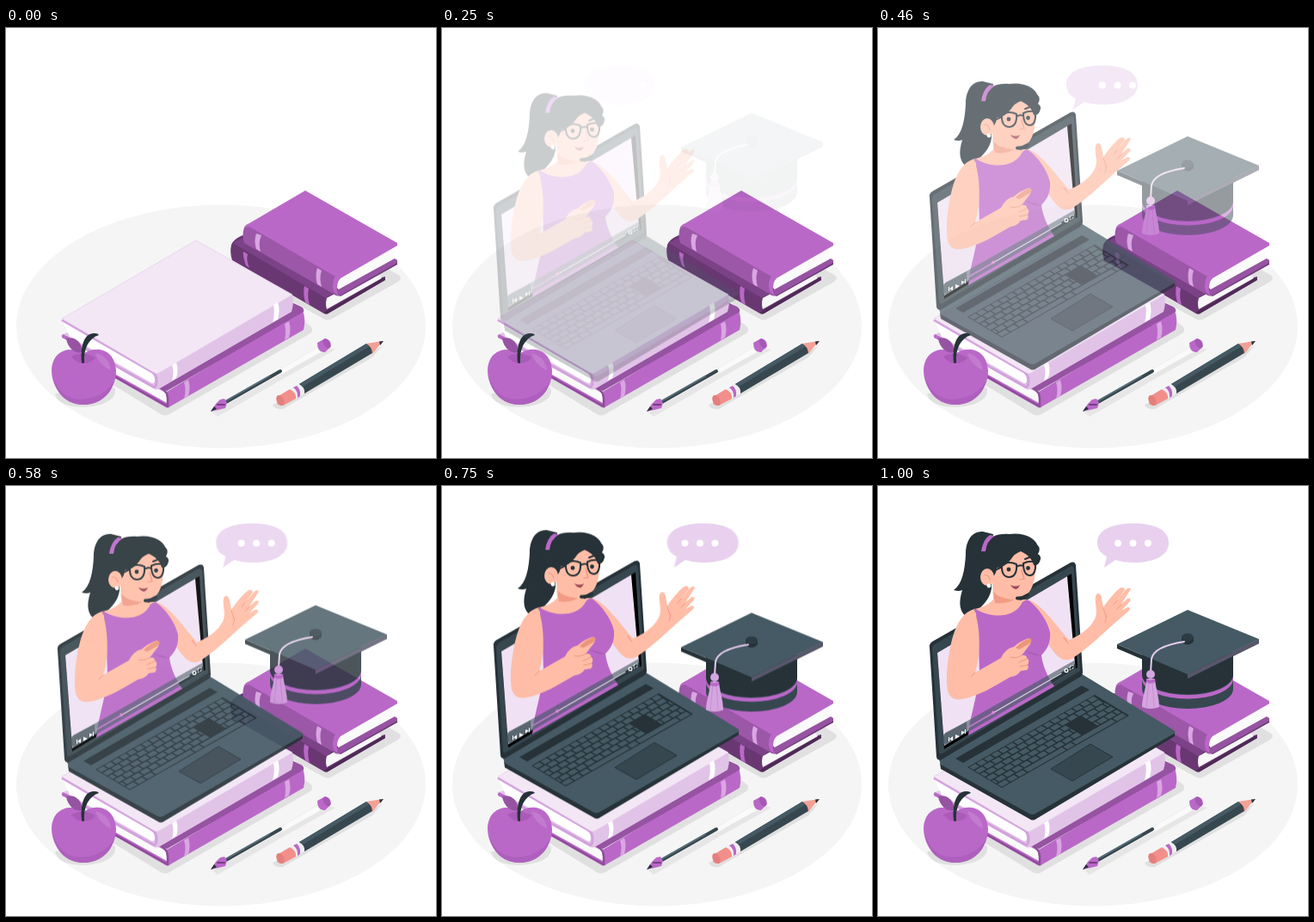
Animation, 500 px wide and 500 px high, one loop 1.04 s. Source, as an HTML page without scripts:

```html
<!DOCTYPE html>
<html lang="en">
<head>
<meta charset="utf-8">
<title>Online lesson</title>
<style>
  html, body { margin: 0; width: 100%; height: 100%; overflow: hidden; background: #fff; }
  svg { display: block; width: 100%; height: 100%; }
  .slide { animation: slide 1040ms cubic-bezier(.36, -.01, .5, 1.38) infinite; }
  .up { --x: 0px; --y: 30px; }
  .down { --x: 0px; --y: -30px; }
  .left { --x: -60px; --y: 0px; }
  @keyframes slide {
    0% { opacity: 0; transform: translate(var(--x), var(--y)); }
    93%, 100% { opacity: 1; transform: translate(0px, 0px); }
  }
  .violet { fill: #ba68c8; }
  .plum { fill: #9653a2; }
  .lilac { fill: #e1c3e8; }
  .dark { fill: #263238; }
  .slate { fill: #37474f; }
  .steel { fill: #455a64; }
  .skin { fill: #ffbda7; }
  .white { fill: #fff; }
  .shade { fill: #e0e0e0; }
  .line { fill: none; stroke-linecap: round; stroke-linejoin: round; }
</style>
</head>
<body>
<svg viewBox="0 0 500 500">
  <ellipse cx="250" cy="347" rx="238" ry="141.5" fill="#f5f5f5"/>

  <g class="shade">
    <path d="M100 400L180 449Q185 452 190 449L354 355Q359 350 352 345L330 330Z"/>
    <path d="M300 300L369 338Q374 341 379 338L456 295Q462 290 456 287L440 278Z"/>
    <path d="M57 425C60 440 82 442 100 440C120 437 130 428 126 418Z"/>
    <path d="M240 447L320 402L376 372L383 374L322 408L246 452Z" opacity=".7"/>
    <path d="M310 438L338 424L420 380L438 369L426 383L346 429L322 443Q312 444 310 438Z"/>
  </g>

  <!-- right-hand books -->
  <g>
    <path d="M262 252Q264 246 275 241L386 303L441 289V293L376 331Q372 334 368 331L263 270Q260 261 262 252Z" fill="#693872"/>
    <path d="M264 250L277 243L384 306L372 314Z" fill="#7c4287"/>
    <path d="M373 314L430 283L437 291L373 327Q371 320 373 314Z" fill="#f7f7f7"/>
    <path d="M372 329L439 290L441 293L376 331Q372 334 370 331Z" fill="#4f2a57"/>
    <path d="M384 309L452 269L455 271V275L389 312Z" fill="#6b3974"/>
    <path d="M276 260Q275 265 279 276L283 279Q279 270 281 263ZM347 300Q345 308 348 319L353 322Q350 312 352 303Z" class="violet"/>
    <path d="M277 232Q280 229 285 227L384 287V311L277 250Q274 240 277 232Z" fill="#9c57a8"/>
    <path d="M386 288L452 254Q448 262 451 269L387 307Q384 298 386 288Z" fill="#fafafa"/>
    <path d="M383 306L452 268L455 270V273L389 311Q383 313 381 308Z" class="plum"/>
    <path d="M348 189L455 250V253L389 291Q384 296 385 306L386 311Q380 308 380 300Q380 292 383 289L283 231L277 232Q278 229 283 227Z" class="violet"/>
    <path d="M291 239Q288 247 291 257L296 260Q293 250 297 241ZM362 279Q359 288 362 298L367 301Q364 291 367 282Z" fill="#d9a6e2"/>
  </g>

  <!-- left-hand books -->
  <g>
    <path d="M95 380L187 423L345 328Q349 340 346 351L191 440Q188 443 184 440L95 389Z" class="violet"/>
    <path d="M110 378L187 422L346 330Q347 326 343 324L330 318L170 405Z" class="plum"/>
    <path d="M110 385L182 422Q187 424 187 430V436L110 393Z" fill="#fafafa"/>
    <path class="line" d="M110 380L181 419Q188 423 188 431V440L110 396" stroke="#8d4c99" stroke-width="2.5"/>
    <path d="M207 412Q210 421 207 431L212 428Q215 418 212 409ZM324 344Q326 353 324 363L329 360Q332 351 329 341Z" fill="#d9a6e2"/>

    <path d="M66 356L72 354L174 402L333 310Q335 321 332 330L179 419Q175 422 171 419L65 359Z" class="lilac"/>
    <path d="M66 341L168 400Q173 403 173 409Q173 415 168 412L74 359Z" class="white"/>
    <path class="line" d="M66 358L171 417Q175 419 175 410Q175 403 170 400L66 340" stroke="#d3a1dd" stroke-width="3"/>
    <path d="M65 338L221 247L333 310L178 401Q175 403 171 400Z" fill="#f3e7f6" stroke="#e6cfec" stroke-width=".8"/>
    <path d="M193 392Q196 400 193 410L198 407Q201 398 198 389ZM311 322Q313 331 310 342L316 339Q319 328 316 319Z" class="white"/>
    <path d="M66 356L74 360L71 363L65 360Z" class="violet"/>
  </g>

  <!-- apple -->
  <g>
    <path d="M90 379C77 369 54 373 53 398C53 420 70 438 90 438C111 438 128 420 128 399C127 372 103 369 90 379Z" class="violet"/>
    <path d="M76 382Q89 375 104 383Q100 390 89 390Q81 389 76 382Z" fill="#a95bb7"/>
    <path d="M55 405C60 425 75 434 93 431C107 430 120 421 126 410C122 428 107 438 90 438C70 438 57 424 55 405Z" fill="#ae5fbd"/>
    <path d="M104 378Q120 382 122 398Q108 392 104 378Z" fill="#c27bce"/>
    <path d="M89 377C82 379 72 374 70 361C79 358 88 364 89 377Z" class="plum"/>
    <path d="M88 389C86 368 92 354 103 355Q107 355 108 357C96 361 90 373 91 389Q90 391 88 389Z" class="dark"/>
  </g>

  <!-- pen -->
  <g class="line">
    <path d="M320 399L366 372" stroke="#fafafa" stroke-width="7"/>
    <path d="M320 396L364 370" stroke="#ececec" stroke-width="1"/>
    <path d="M254 436L319 399" stroke="#37474f" stroke-width="4"/>
    <path d="M255 434L306 405" stroke="#5a6f79" stroke-width="1.8"/>
    <path d="M238 446L244 437L249 432L254 431L257 436L255 442L247 444Z" class="violet"/>
    <path d="M238 446L242 440L245 443Z" class="dark"/>
    <path d="M246 438L254 438" stroke="#76407f" stroke-width="2"/>
    <path d="M362 366L371 361Q378 362 378 370L371 377Q362 378 362 366Z" class="violet"/>
    <ellipse cx="373" cy="367" rx="3.5" ry="6" transform="rotate(-30 373 367)" fill="#a659b4"/>
  </g>

  <!-- pencil -->
  <g>
    <path d="M315 429L330 420Q338 422 337 431L322 439Q313 440 315 429Z" fill="#f28f8b"/>
    <ellipse cx="319" cy="433" rx="4" ry="6.5" transform="rotate(-28 319 433)" fill="#e37f7c"/>
    <path d="M330 420L341 414Q348 418 347 425L337 431Q338 424 330 420Z" fill="#eee"/>
    <path d="M334 418L338 416Q343 420 342 428L339 430Q340 422 334 418Z" class="violet"/>
    <path d="M341 414L419 367Q427 371 426 378L347 425Q348 418 341 414Z" class="slate"/>
    <path d="M341 414L419 367L423 370L345 417Z" class="steel"/>
    <path d="M419 367L438 364L426 379Q426 371 419 367Z" fill="#f4a096"/>
    <path d="M434 364.5L439 364L435 369Z" class="dark"/>
  </g>

  <g class="slide up">
    <!-- laptop -->
    <path d="M72 322L180 379L345 285V291L184 387Q180 390 176 387L73 329Z" class="dark"/>
    <path d="M71 318L236 218L344 284Q347 286 344 288L183 381Q180 383 176 381L73 324Z" class="steel"/>
    <path d="M90 317L237 232L246 237L99 322Z" class="dark"/>
    <g transform="matrix(1 -.57 1 .6 104 327)" fill="none">
      <path d="M0 0H148V40H0Z" class="dark"/>
      <g stroke="#455a64" stroke-width="5.1">
        <path d="M1 3.5H146" stroke-dasharray="7 1.6"/>
        <path d="M1 10H146M1 23.2H100M119 23.2H146" stroke-dasharray="8.2 1.5"/>
        <path d="M1 16.6H100M119 16.6H146" stroke-dasharray="8.2 1.5" stroke-dashoffset="4"/>
        <path d="M1 29.8H100M119 29.8H146" stroke-dasharray="8.2 1.5" stroke-dashoffset="6"/>
        <path d="M1 36.4H10M11.5 36.4H20M21.5 36.4H30M31.5 36.4H76M77.5 36.4H86M87.5 36.4H146" stroke-dasharray="46 1.5"/>
      </g>
    </g>
    <path d="M201 329L247 300L273 315L226 343Z" class="slate" stroke="#263238" stroke-width=".9"/>

    <path d="M60 188Q59 184 63 181L224 89Q229 87 230 92L238 216Q238 220 235 222L74 318Q69 320 68 315Z" class="dark"/>
    <path d="M63 189Q63 186 66 184L223 94Q227 92 228 96L235 215L75 311Q71 313 71 309Z" class="slate"/>
    <path d="M69 194L225 102L232 211L77 306Z" fill="#000"/>
    <path d="M69 194L220 105L229 207L77 302Z" fill="#f0e2f4"/>

    <!-- teacher -->
    <path d="M122 53C107 52 102 67 102 79C101 98 98 114 88 121Q94 123 98 121C93 137 95 147 104 153C111 147 129 138 132 119L131 82L134 56Z" class="dark"/>
    <path d="M174 132C190 137 203 157 222 179C237 173 253 161 254 147C254 139 251 130 254 126Q258 123 260 130L262 141C268 132 275 124 281 119Q286 116 287 121L278 133L287 122Q292 116 294 120L283 137L290 131Q295 129 293 134L283 145L290 141Q295 141 292 145L278 157C266 167 246 188 225 201Q216 205 208 197C196 183 184 164 174 132Z" class="skin"/>
    <path class="line" d="M265 152Q264 147 262 142M278 133L274 138M283 138L278 143M264 159L266 151" stroke="#f0977f" stroke-width=".9"/>
    <path d="M113 143Q127 140 134 132L133 113H164L165 133Q170 131 175 133L177 152L140 162Z" class="skin"/>
    <path d="M134 123Q144 133 160 131Q150 138 136 136Z" fill="#f29c85"/>
    <path d="M112 142C128 153 158 156 168 135Q171 132 175 133C185 140 197 156 200 170C201 186 194 192 190 197C192 211 198 223 205 233L105 290C107 265 118 237 118 216C117 190 118 163 112 142Z" class="violet"/>
    <path d="M190 197C179 199 171 190 166 190Q180 194 190 197Z" class="plum" opacity=".5"/>
    <path d="M112 143C94 148 87 171 83 193C80 210 79 225 81 238Q84 250 97 248C116 245 137 232 154 222Q162 221 166 215L173 214Q176 211 174 208Q177 203 173 200Q173 196 167 197L177 184Q179 179 175 177Q164 181 158 187Q148 189 143 200L113 217C119 198 120 169 112 143Z" class="skin"/>
    <path d="M160 188Q169 179 177 177Q181 180 175 184L164 190Z" fill="#ec957b"/>
    <path class="line" d="M154 199Q160 201 167 197M164 205L173 201M165 210L174 208M113 217L108 222M219 180Q212 171 221 183" stroke="#f0977f" stroke-width="1"/>

    <path d="M132 83Q153 66 180 76C185 97 183 113 176 123Q167 132 155 132C143 130 136 123 132 111Z" class="skin"/>
    <path d="M119 103C114 72 127 54 152 56C171 53 183 62 185 68Q190 73 186 79Q191 82 188 88Q186 93 181 92C179 84 173 79 166 76Q159 78 154 86Q147 95 138 95Q137 106 131 106Z" class="dark"/>
    <path d="M120 76Q122 62 130 57L136 58Q126 64 125 76Z" class="violet"/>
    <ellipse cx="127" cy="106" rx="8" ry="10" class="skin"/>
    <path class="line" d="M124 103Q129 103 130 109" stroke="#f0977f" stroke-width="1.2"/>
    <circle cx="129" cy="116" r="2.4" class="white"/>
    <g class="line" stroke="#263238" stroke-width="2">
      <path d="M144 91Q153 87 161 91Q162 105 153 106Q143 106 144 91ZM169 90Q177 86 183 89Q184 103 177 104Q169 104 169 90ZM161 94Q165 91 169 93M144 94L134 99"/>
      <path d="M171 85L176 83"/>
      <path d="M162 130.500Q168 131 174 127" stroke-width="4"/>
    </g>
    <circle cx="152" cy="97" r="2.4" class="dark"/>
    <circle cx="174.500" cy="95.500" r="2.4" class="dark"/>
    <path class="line" d="M167 98L170 108L165 109" stroke="#f0907a" stroke-width="1.2"/>
    <path d="M154 115Q160 118 165 115Q163 120 160 120Q156 119 154 115Z" fill="#a2475a"/>

    <!-- player bar -->
    <path d="M76 289L228 203Q230 204 230 214L79 301Q76 302 76 298Z" fill="#455a64" opacity=".62"/>
    <path d="M78 287L103 274V286L79 300Q76 300 76 292Z" class="slate" opacity=".55"/>
    <path class="line" d="M106 280L213 218" stroke="#d5d9db" stroke-width="1.2"/>
    <path class="line" d="M106 280L134 263.500" stroke="#ba68c8" stroke-width="1.2"/>
    <circle cx="134" cy="263.500" r="1.9" fill="#d783d6"/>
    <path d="M82 292V297H83V292ZM87 291V296L83 294.500ZM90 289L95 291L90 294ZM97 285L101 286L97 289.500ZM101 283V288H102V283Z" class="white"/>
    <circle cx="219" cy="214.500" r="1.9" fill="none" stroke="#fff" stroke-width="1.3"/>
    <path d="M223 210V214L227 212V208Z" fill="none" stroke="#fff" stroke-width="1" stroke-dasharray="2.2 1.4"/>
  </g>

  <!-- graduation cap -->
  <g class="slide down"><g class="slide down">
    <path d="M307 190V236A53 23 0 0 0 413 236V190Z" class="slate"/>
    <path d="M307 190V219A53 23 0 0 0 413 219V190Z" class="dark"/>
    <path d="M307 220A53 23 0 0 0 413 220V224.500A53 23 0 0 1 307 224.500Z" class="violet"/>
    <path d="M278 184L360 219L443 178V183L360 224L278 189Z" class="dark"/>
    <path d="M360 219L443 178V183L360 224Z" fill="#58566a"/>
    <path d="M278 184L360 144L443 178L360 219Z" class="steel"/>
    <path d="M353 176V181Q360 188 367 181V176Z" class="dark"/>
    <ellipse cx="360" cy="176" rx="7" ry="4.500" fill="#2d3b42"/>
    <path class="line" d="M356 181C337 184 320 190 318 201L317 217" stroke="#e6cbec" stroke-width="2"/>
    <path d="M312 224H322C323 236 327 245 327 257Q317 261 307 257C307 245 312 236 312 224Z" fill="#d5a5df"/>
    <path class="line" d="M315 227L312 257M319 227L321 257" stroke="#c58bd1" stroke-width=".8"/>
    <circle cx="317" cy="219" r="5" fill="#d5a5df"/>
    <path d="M312 224Q317 227 322 224V228Q317 231 312 228Z" class="violet"/>
  </g></g>

  <!-- speech bubble -->
  <g class="slide left">
    <path class="slide left" d="M297 43.500C322 43.500 338 51 338 66C338 81 321 89 297 89Q285 89 276 86L263 95L266 82Q255 77 255 66C255 51 272 43.500 297 43.500Z" fill="#e8d0ee"/>
    <g class="white">
      <circle cx="279" cy="66.500" r="4"/>
      <circle cx="296.500" cy="66.500" r="4"/>
      <circle cx="314" cy="66.500" r="4"/>
    </g>
  </g>
</svg>
</body>
</html>
```
